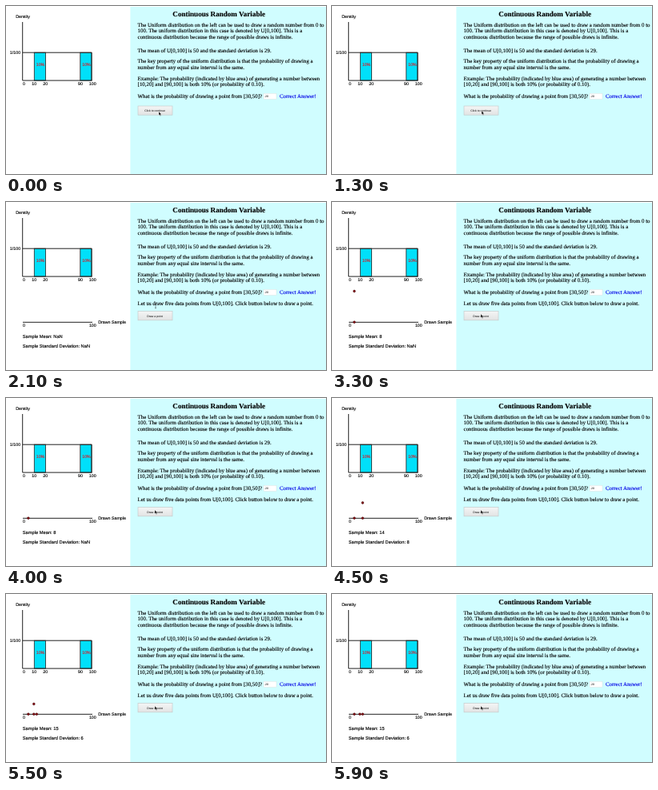
An HTML page for the animation above (6000 ms loop, 400x210 px).

```html
<!DOCTYPE html>
<html lang="en">
<head>
<meta charset="utf-8">
<title>Continuous Random Variable</title>
<style>
  html, body { margin: 0; width: 100%; height: 100%; overflow: hidden; background: #fff; }
  svg { display: block; width: 100vw; height: 100vh; }
  text {
    font: 5.3px "Liberation Sans", Arial, sans-serif; text-rendering: geometricPrecision; white-space: pre;
    color: #000; fill: currentColor; stroke: currentColor; stroke-width: .14;
  }
  .mid { text-anchor: middle; }
  .serif { font: 6.89px "Liberation Serif", "Times New Roman", serif; }
  .title { font: bold 9.1px "Liberation Serif", "Times New Roman", serif; text-anchor: middle; }
  .stat { font-size: 5.72px; }
  .tiny { font-size: 3.5px; stroke: none; }
  .red { color: #d8202c; }
  .blue { color: #0000e6; }
  .axis { stroke: #222; stroke-width: 1; fill: none; }
  .area { fill: #00e0fa; stroke: #222; stroke-width: .8; }
  .dot { fill: #8c1018; stroke: #300; stroke-width: .5; }
</style>
</head>
<body>
<svg viewBox="0 0 400 210" preserveAspectRatio="none">
  <defs>
    <linearGradient id="face" x2="0" y2="1">
      <stop offset="0" stop-color="#f4f5f5"/>
      <stop offset="1" stop-color="#e2e3e3"/>
    </linearGradient>
  </defs>
  <rect width="400" height="210" fill="#fff"/>
  <rect x="155.4" y="1" width="244.6" height="209" fill="#d0fdff"/>

  <g id="chart">
    <rect class="area" x="35.3" y="58.2" width="14.2" height="34.9"/>
    <rect class="area" x="92.8" y="58.2" width="14.2" height="34.9"/>
    <path class="axis" d="M20.7 20V93.1H107.5M20.7 58.2H107V93.1"/>
  </g>

  <g id="sample">
    <path class="axis" d="M21 150.3H108"/>
    <text x="115.2" y="151.6">Drawn Sample</text>
    <text class="mid" x="22.5" y="156.3">0</text>
    <text class="mid" x="108.3" y="156.3">100</text>
    <text id="mean" class="stat" x="20.8" y="170"></text>
    <text id="sd" class="stat" x="20.8" y="181.7"></text>
    <g id="dots"></g>
    <circle id="drop" class="dot" r="1.4"/>
  </g>

  <g id="prose"></g>
  <rect x="322" y="109.2" width="16" height="7.4" fill="#fff" stroke="#cfdcdc" stroke-width=".4"/>
  <text class="tiny" x="323" y="114.1">.20</text>
  <text class="serif blue" x="342" y="114.6">Correct Answer!</text>
  <text id="next" class="serif" x="164.6" y="129.3">Let us draw five data points from U[0,100]. Click button below to draw a point.</text>

  <g id="button">
    <rect id="key" x="165" y="125" width="43" height="11.2" stroke="#c2c6c6" stroke-width=".6"/>
    <text id="label" class="tiny mid" x="186" y="132"></text>
  </g>

  <path id="arrow" d="M0 0V4.6L1.1 3.7L1.9 5.4L2.7 5L1.9 3.4H3.3Z" fill="#000" stroke="#fff" stroke-width=".35"/>
  <path id="beam" d="M-1 0Q0 0 0 .8Q0 0 1 0M0 .8V5M-1 5.8Q0 5.8 0 5Q0 5.8 1 5.8" fill="none" stroke="#333" stroke-width=".5"/>
</svg>
<script>
const NS = 'http://www.w3.org/2000/svg';
const $ = id => document.getElementById(id);

function add(parent, tag, attrs, text) {
  const el = document.createElementNS(NS, tag);
  for (const k in attrs) el.setAttribute(k, attrs[k]);
  if (text) el.textContent = text;
  return parent.appendChild(el);
}

const labels = [
  ['Density', 21, 15.2], ['1/100', 11.5, 60],
  ['0', 22.5, 99], ['10', 35.3, 99], ['20', 49.3, 99], ['90', 93, 99], ['100', 108.2, 99],
  ['10%', 43, 75.4, 'red'], ['10%', 100.5, 75.4, 'red']
];
for (const [s, x, y, c = ''] of labels) add($('chart'), 'text', { x, y, class: 'mid ' + c }, s);

const prose = [
  [25.5, 'The Uniform distribution on the left can be used to draw a random number from 0 to'],
  [33.4, '100. The uniform distribution in this case is denoted by U[0,100]. This is a'],
  [41.2, 'continuous distribution because the range of possible draws is infinite.'],
  [57.6, 'The mean of U[0,100] is 50 and the standard deviation is 29.'],
  [71.2, 'The key property of the uniform distribution is that the probability of drawing a'],
  [79, 'number from any equal size interval is the same.'],
  [92.8, 'Example: The probability (indicated by blue area) of generating a number between'],
  [100.4, '[10,20] and [90,100] is both 10% (or probability of 0.10).'],
  [114.9, 'What is the probability of drawing a point from [30,50]?']
];
add($('prose'), 'text', { x: 266.2, y: 12.6, class: 'title' }, 'Continuous Random Variable');
for (const [y, s] of prose) add($('prose'), 'text', { x: 164.6, y, class: 'serif' }, s);

const LOOP = 6000, STEP = 100, NEXT = 1700, FALL = 700;
const draws = [
  { at: 3200, value: 8 },
  { at: 4100, value: 20 },
  { at: 5000, value: 16 }
];
const place = v => 21 + v * 0.865;
for (const d of draws) d.dot = add($('dots'), 'circle', { class: 'dot', cx: place(d.value), cy: 150.2, r: 1.4 });

// time, x, y of the pointer tip
const track = [[0, 191, 132], [900, 191, 132], [1300, 187, 131], [1699, 187, 131],
  [1700, 187, 127], [2400, 187, 127], [3100, 186, 140], [LOOP, 186, 140]];

function pointer(t) {
  const i = track.findIndex(p => p[0] > t);
  const [t0, x0, y0] = track[i - 1], [t1, x1, y1] = track[i];
  const k = (t - t0) / (t1 - t0);
  return [x0 + (x1 - x0) * k, y0 + (y1 - y0) * k];
}

function stats(values) {
  const n = values.length;
  const mean = values.reduce((a, b) => a + b, 0) / n;
  const spread = values.reduce((a, b) => a + (b - mean) ** 2, 0);
  const sd = n > 1 ? Math.sqrt(spread / (n - 1)) : NaN;
  return [mean, sd].map(Math.round);
}

const show = (el, on) => el.setAttribute('visibility', on ? 'visible' : 'hidden');

function render(t) {
  const drawing = t >= NEXT;
  $('sample').style.display = drawing ? '' : 'none';
  show($('next'), drawing);
  $('label').textContent = drawing ? 'Draw a point' : 'Click to continue';
  $('button').setAttribute('transform', `translate(0 ${drawing ? 11.6 : 0})`);

  const done = draws.filter(d => d.at <= t);
  for (const d of draws) show(d.dot, d.at <= t);
  const [mean, sd] = stats(done.map(d => d.value));
  $('mean').textContent = 'Sample Mean: ' + mean;
  $('sd').textContent = 'Sample Standard Deviation: ' + sd;

  const last = done[done.length - 1];
  const age = last ? t - last.at : Infinity;
  show($('drop'), age < FALL);
  if (age < FALL) {
    $('drop').setAttribute('cx', place(last.value));
    $('drop').setAttribute('cy', 105 + age * 0.065);
  }
  $('key').setAttribute('fill', age < STEP && last.at > 4000 ? '#adadad' : 'url(#face)');

  const [x, y] = pointer(t);
  const overText = drawing && y < 131;
  show($('beam'), overText);
  show($('arrow'), !overText);
  $(overText ? 'beam' : 'arrow').setAttribute('transform', `translate(${x} ${y})`);
}

const start = performance.now();
function tick() {
  const t = (performance.now() - start) % LOOP;
  render(Math.floor(t / STEP) * STEP);
  requestAnimationFrame(tick);
}
tick();
</script>
</body>
</html>
```
